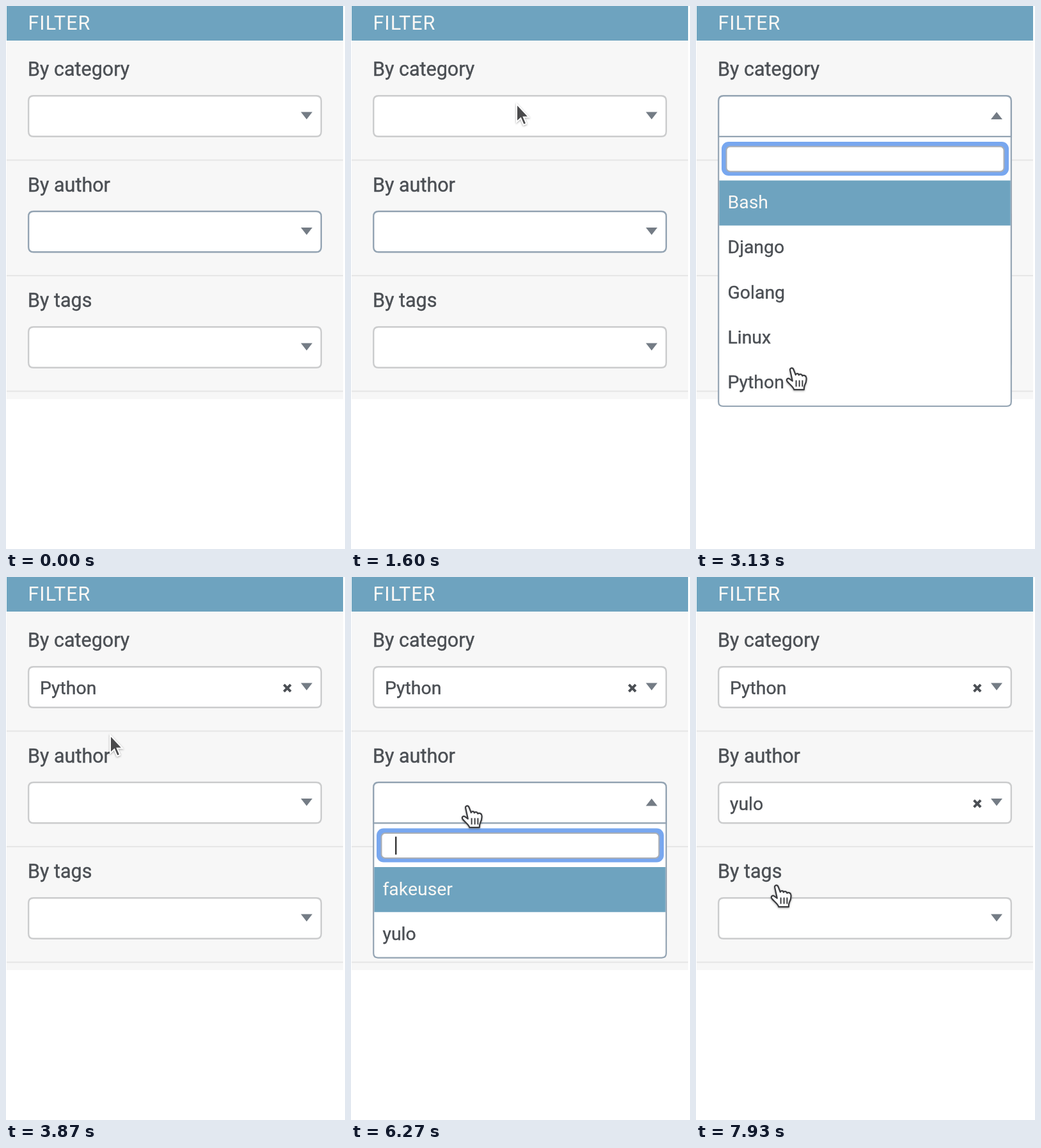
Write an HTML page that moves like this. It is 530 px wide and 848 px high and loops after 8000 ms.

```html
<!DOCTYPE html>
<html lang="en">
<head>
<meta charset="utf-8">
<title>Filter panel</title>
<style>
  html, body { margin: 0; width: 100%; height: 100%; overflow: hidden; background: #fff; }
  svg { display: block; width: 530px; height: 848px; }
  text { font-family: Roboto, Arial, sans-serif; font-size: 28.4px; fill: #4b4f54; stroke: #4b4f54; stroke-width: .4px; }
  .label { font-size: 30.5px; }
  .light { fill: #fbf8f5; stroke: none; }
  .muted { fill: #8d949d; stroke: #8d949d; }
  .cursor { filter: drop-shadow(0 1.5px 1.5px rgba(0, 0, 0, .35)); }
</style>
</head>
<body>
<svg id="stage" viewBox="0 0 530 848"></svg>
<script>
const LOOP = 8000, FPS = 15;
const BLUE = '#6ea3bf', GREY = '#cbcccd', FOCUS = '#94a4b3';
const STEP = 180.5, ROW = 70.3;
const CATEGORIES = ['Bash', 'Django', 'Golang', 'Linux', 'Python'];
const AUTHORS = ['fakeuser', 'yulo'];

// Cursor moves: first tick, last tick, x, y, shape at the end of the move
const MOVES = [
  [8, 8, 304, 719, 'arrow'],
  [13, 15, 309, 684, 'arrow'],
  [19, 24, 257, 151, 'arrow'],
  [25, 30, 239, 160, 'hand'],
  [33, 35, 180, 161, 'hand'],
  [43, 47, 140, 564, 'hand'],
  [53, 54, 150, 500, 'hand'],
  [57, 57, 156, 330, 'hand'],
  [58, 58, 161, 245, 'arrow'],
  [59, 59, 157, 227, 'arrow'],
  [61, 64, 160, 300, 'arrow'],
  [65, 66, 162, 337, 'hand'],
  [71, 75, 172, 356, 'hand'],
  [101, 103, 150, 527, 'hand'],
  [110, 116, 118, 491, 'hand'],
  [118, 119, 116, 480, 'hand']
];

const SHAPES = {
  arrow: `<path d="M2 2V30L8.3 24.2 12.8 34.6 17.2 32.7 12.8 22.4H21Z"
    fill="#4a4a4c" stroke="#fff" stroke-width="2"/>`,
  hand: `<path d="M7.3 5.5C6 1 11 0 12.6 4L15.8 12C16.4 9.5 20.2 9.6 20.8 12.4
    C21.8 10.3 25.6 10.8 26.2 13.6C28 12 32 13 32.4 16.5C33 21 31.6 25 30 28C29 30 28.8 32 28.8 35.2
    H13.4C12.4 31 6 26.5 2.6 22.3C.6 19 3.4 16.4 6.6 18.6L10.8 21.6Z"
    fill="#fff" stroke="#3c3d40" stroke-width="2.2" stroke-linejoin="round"/>
    <path d="M16.6 20.5V30.5M21.6 20.5V30.5M26.4 20.5V30.5" stroke="#3c3d40" stroke-width="2"/>`
};

const rect = (x, y, w, h, fill, more = '') =>
  `<rect x="${x}" y="${y}" width="${w}" height="${h}" fill="${fill}" ${more}/>`;
const text = (x, y, s, cls = '') => `<text x="${x}" y="${y}" class="${cls}">${s}</text>`;
const outline = (colour, width) => `stroke="${colour}" stroke-width="${width}"`;

function field(i, label, { value, open, focus }) {
  const bottom = open ? 'V204H35.2V148' : 'V196q0 7.8-7.8 7.8H43q-7.8 0-7.8-7.8V148';
  const cross = '<path d="M434.5 168.2l10.6 10.6m0-10.6l-10.6 10.6" stroke="#4b4f54" stroke-width="4"/>';
  return `<g transform="translate(0 ${i * STEP})">
    ${text(34, 109, label, 'label')}
    <path d="M35.2 148q0-7.8 7.8-7.8H485q7.8 0 7.8 7.8${bottom}Z" fill="#fff"
      ${outline(open || focus ? FOCUS : GREY, 2.4)}/>
    <path d="${open ? 'M461 177h18l-9-11.5' : 'M461 165.5h18l-9 11.5'}z" fill="#747c85"/>
    ${value ? text(53, 183, value) + cross : ''}
    ${rect(1, 239.5, 526, 2.2, '#e7e7e7')}
  </g>`;
}

function panel(i, items, active, caret) {
  const end = 272.5 + items.length * ROW;
  const rows = items.map((s, n) => {
    const y = 272.5 + n * ROW, on = n === active;
    const cls = on ? 'light' : active < 0 ? 'muted' : '';
    return (on ? rect(36.3, y, 455.4, ROW, BLUE) : '') + text(49.5, y + 43.5, s, cls);
  }).join('');
  return `<g transform="translate(0 ${i * STEP})">
    <path d="M35.2 204H492.8V${end - 6}q0 7-7 7H42.2q-7 0-7-7Z" fill="#fff" ${outline(FOCUS, 2.2)}/>
    ${rect(40, 212, 449, 53, '#78a7ef', 'rx="11"')}
    ${rect(47.5, 219.5, 434, 39, '#fff', `rx="6" ${outline('#a9aeb5', 2)}`)}
    ${caret ? rect(69, 225, 2.4, 28, '#333') : ''}
    ${rows}
  </g>`;
}

function cursor(k) {
  if (k < MOVES[0][0]) return '';
  let [, , x, y, shape] = MOVES[0];
  for (const [from, to, nx, ny, kind] of MOVES) {
    if (k < from) break;
    const p = Math.min(1, (k - from + 1) / (to - from + 1));
    const e = p * p * (3 - 2 * p);
    x += (nx - x) * e;
    y += (ny - y) * e;
    shape = kind;
  }
  return `<g class="cursor" opacity="${k === 8 ? .5 : 1}" transform="translate(${x} ${y})">${SHAPES[shape]}</g>`;
}

function scene(k) {
  const within = (a, b) => k >= a && k < b;
  const blink = start => (k - start) % 15 < 8;
  let s = rect(1, 0, 526, 614, '#f7f7f7') + rect(1, 0, 526, 54, BLUE)
    + `<g letter-spacing="1">${text(34.5, 36.5, 'FILTER', 'label light')}</g>`
    + field(0, 'By category', { value: k >= 53 && 'Python', open: within(37, 53) })
    + field(1, 'By author', { value: k >= 118 && AUTHORS[1], open: within(78, 118), focus: k < 27 })
    + field(2, 'By tags', {});
  if (k === 37) s += panel(0, ['Searching…'], -1, true);
  if (within(38, 53)) s += panel(0, CATEGORIES, k < 51 ? 0 : 4, blink(37));
  if (within(78, 103)) s += panel(1, AUTHORS, k < 102 ? 0 : 1, blink(78));
  return s + cursor(k);
}

const stage = document.getElementById('stage');
const start = performance.now();
let shown = -1;
function draw() {
  const t = (performance.now() - start) % LOOP;
  const k = Math.floor((t + 4) * FPS / 1000) % (LOOP * FPS / 1000);
  if (k !== shown) stage.innerHTML = scene(shown = k);
  requestAnimationFrame(draw);
}
draw();
</script>
</body>
</html>
```
